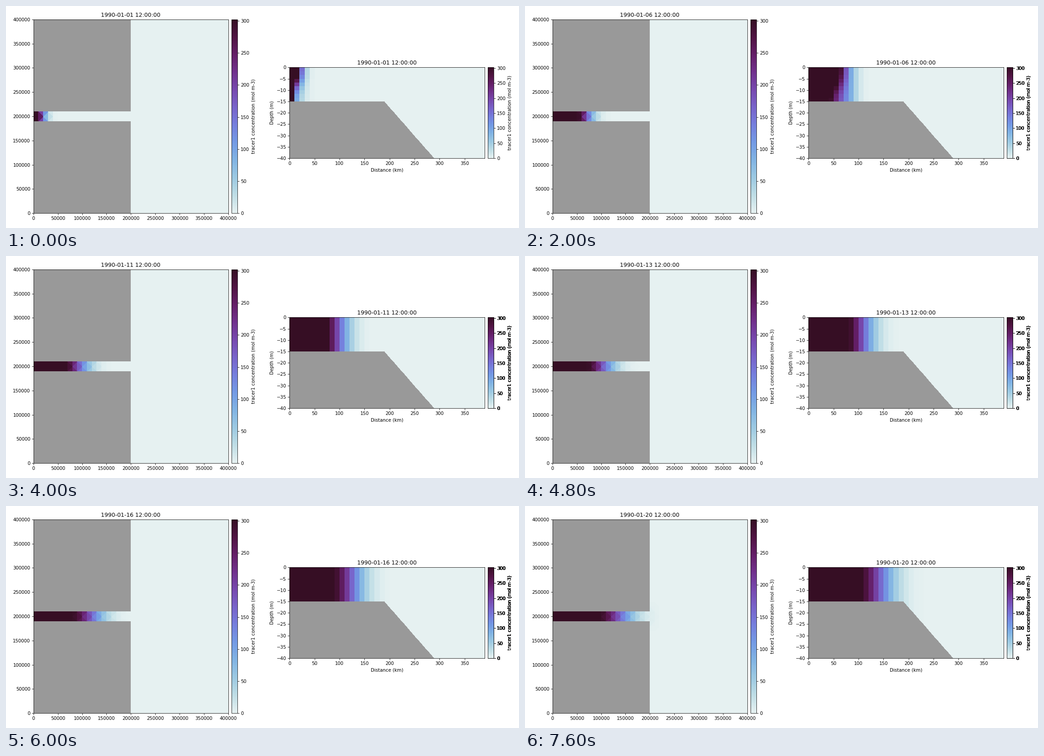
Recreate the animation shown at these times as a matplotlib script. Size 1135 by 493 pixels, loop 8000 ms.

```python
import math

import matplotlib.pyplot as plt
import numpy as np
from matplotlib.animation import FuncAnimation
from matplotlib.cm import ScalarMappable
from matplotlib.colors import LinearSegmentedColormap, Normalize

W, H = 1135, 493
DAYS = 20
VMAX = 302.4
S = 74 / 72  # one typographic point in pixels

plt.rcParams.update({
    "font.family": "DejaVu Sans", "font.size": 10 * S,
    "axes.linewidth": 0.8 * S, "axes.titlepad": 6 * S,
    "axes.labelpad": 4 * S,
    "xtick.major.size": 3.5 * S, "ytick.major.size": 3.5 * S,
    "xtick.major.width": 0.8 * S, "ytick.major.width": 0.8 * S,
    "xtick.major.pad": 3.5 * S, "ytick.major.pad": 3.5 * S,
})

SHADES = ["#e6f1f1", "#bfdde5", "#9cc9e2", "#81b4e3", "#739ae4", "#757fdd",
          "#7864ca", "#774aaf", "#71328d", "#641f68", "#501442", "#360e24"]
cmap = LinearSegmentedColormap.from_list("dense", SHADES)
norm = Normalize(0, VMAX)
scale = ScalarMappable(norm, cmap)

# Front of the tracer, in cells of 10 km: centre, spread and strength by day,
# then where the vertical shear ends and how much it squeezes at the bottom.
KEY_DAY = [0, 1, 3, 7, 10, 14, 17, 19]
FRONT = [
    [1.28, 3.05, 5.12, 7.55, 9.1, 11.4, 12.6, 13.7],
    [1.1, 1.3, 1.69, 2.04, 2.45, 2.75, 3.08, 3.14],
    [600, 600, 600, 400, 380, 345, 345, 345],
    [4.5, 6, 8, 8.5, 9, 9, 9, 9],
    [0.6, 0.5, 0.4, 0.7, 1, 1, 1, 1],
]
erf = np.vectorize(math.erf)


def tracer(day, x, depth=0.0):
    """Concentration at x (cells from the source), depth from 0 to 1."""
    c, s, amp, end, squeeze = (np.interp(day, KEY_DAY, row) for row in FRONT)
    k = 1 - (1 - squeeze) * depth ** 2 * (3 - 2 * depth)
    xs = np.where(x < end, end - (end - x) * k, x)
    v = amp * 0.5 * (1 - erf((xs - c) / (s * math.sqrt(2))))
    return np.where(x <= 0, VMAX, np.minimum(v, VMAX))


def add_axes(x0, y0, x1, y1):
    return fig.add_axes([x0 / W, 1 - y1 / H, (x1 - x0) / W, (y1 - y0) / H])


def add_bar(x0, y0, x1, y1):
    cax = add_axes(x0, y0, x1, y1)
    bar = fig.colorbar(scale, cax=cax, ticks=range(0, 301, 50))
    bar.set_label("tracer1 concentration (mol m-3)")
    return cax


fig = plt.figure(figsize=(W / 72, H / 72), dpi=72, facecolor="white")

# Plan view: triangles with alternating diagonals over channel and open water.
N = 41
gx, gy = np.meshgrid(np.arange(N), np.arange(N))
triangles = []
for j in range(N - 1):
    for i in range(N - 1):
        if i < 20 and j not in (19, 20):
            continue
        a = j * N + i
        b, d = a + 1, a + N
        e = d + 1
        if (i + j) % 2:
            triangles += [(a, b, d), (b, e, d)]
        else:
            triangles += [(a, b, e), (a, e, d)]
triangles = np.array(triangles)
off_axis = np.maximum(np.abs(gy - 20) - 1, 0)
reach = np.where(gx < 20, gx, 20 + np.hypot(gx - 20, off_axis)).ravel()


def plan(day):
    return tracer(day, reach)[triangles].mean(axis=1)


plan_ax = add_axes(61, 29.7, 491.6, 460.2)
plan_ax.set_facecolor("0.6")
plan_mesh = plan_ax.tripcolor(gx.ravel() * 1e4, gy.ravel() * 1e4, triangles,
                              facecolors=plan(0), cmap=cmap, norm=norm)
plan_ax.set(xlim=(0, 4e5), ylim=(0, 4e5),
            xticks=range(0, 400001, 50000), yticks=range(0, 400001, 50000))
add_bar(499, 29.7, 512, 460.2)

# Section: nine layers following the bottom.
edge = np.arange(40)
bottom = np.interp(edge, [19, 29], [15, 40])
layer = np.linspace(0, 1, 10)[:, None]
cell_x, cell_f = np.meshgrid(np.arange(39), np.arange(9) / 8)


def section(day):
    return tracer(day, cell_x, cell_f)


cut_ax = add_axes(627.3, 136.3, 1058.9, 338.1)
cut_ax.set_facecolor("0.6")
cut_mesh = cut_ax.pcolormesh(np.tile(edge * 10, (10, 1)), -layer * bottom,
                             section(0), cmap=cmap, norm=norm)
cut_ax.set(xlim=(0, 390), ylim=(-40, 0), xticks=range(0, 351, 50),
           yticks=range(-40, 1, 5), xlabel="Distance (km)",
           ylabel="Depth (m)")

# The right colour bar is drawn once more each day, so its text thickens.
bars = [add_bar(1066, 136.3, 1079, 338.1) for _ in range(DAYS)]
titles = [ax.set_title("") for ax in (plan_ax, cut_ax)]


def update(day):
    plan_mesh.set_array(plan(day))
    cut_mesh.set_array(section(day))
    for k, bar in enumerate(bars):
        bar.set_visible(k <= day)
    for title in titles:
        title.set_text(f"1990-01-{day + 1:02d} 12:00:00")
    return [plan_mesh, cut_mesh, *bars, *titles]


anim = FuncAnimation(fig, update, frames=DAYS, interval=400, repeat=True,
                     repeat_delay=0, blit=False)
plt.show()
```
